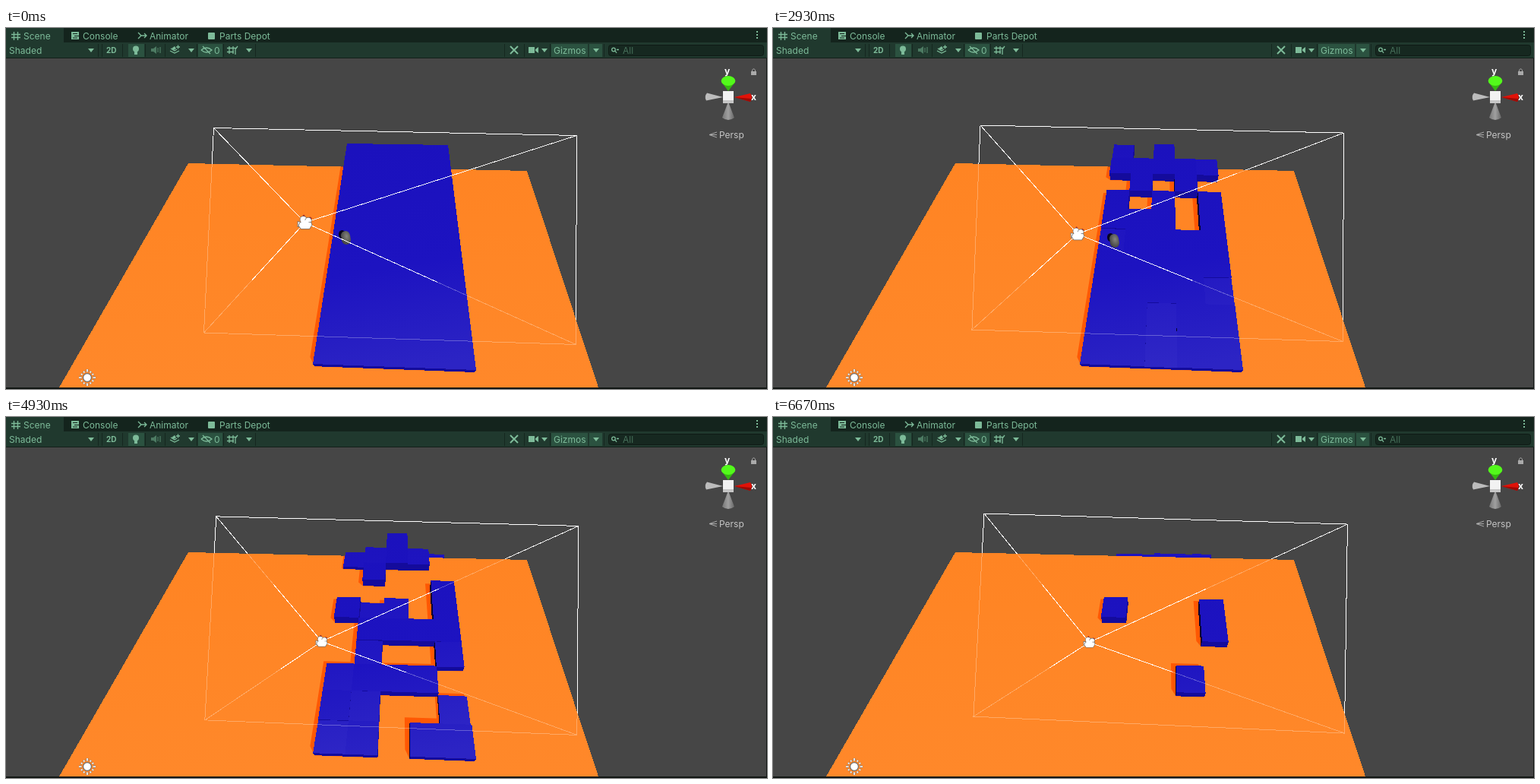
Animation of 1002 by 475 pixels, one loop 6.74 s. Source, as an HTML page:

```html
<!DOCTYPE html>
<html lang="en">
<head>
<meta charset="utf-8">
<title>Falling tiles</title>
<style>
  html, body { margin: 0; width: 100%; height: 100%; overflow: hidden; background: #464646; }
  svg { display: block; width: 1002px; height: 475px; }
  text { font: 12px Inter, "Liberation Sans", sans-serif; fill: #7dbb99; }
  .crisp { shape-rendering: crispEdges; }
  .wire { fill: none; stroke: #fff; stroke-width: 1; shape-rendering: crispEdges; }
  .ico { fill: none; stroke: #7dbb99; stroke-width: 1.3; }
  .solid { fill: #7dbb99; }
</style>
</head>
<body>
<svg viewBox="0 0 1002 475">
  <defs>
    <linearGradient id="top" gradientUnits="userSpaceOnUse" x1="480" y1="150" x2="530" y2="450">
      <stop offset="0" stop-color="#1b11bd"/><stop offset=".55" stop-color="#1d13c1"/><stop offset="1" stop-color="#2c24c4"/>
    </linearGradient>
    <linearGradient id="loose" gradientUnits="userSpaceOnUse" x1="480" y1="150" x2="530" y2="450">
      <stop offset="0" stop-color="#1c12be"/><stop offset=".55" stop-color="#2117c2"/><stop offset="1" stop-color="#3028c6"/>
    </linearGradient>
    <linearGradient id="floor" x1="0" y1="0" x2="0" y2="1">
      <stop offset="0" stop-color="#ff8423"/><stop offset="1" stop-color="#ff882a"/>
    </linearGradient>
    <radialGradient id="pill" cx=".6" cy=".4" r=".65">
      <stop offset="0" stop-color="#85857f"/><stop offset="1" stop-color="#40403f"/>
    </radialGradient>
    <linearGradient id="cone" x1="0" y1="0" x2="1" y2="0">
      <stop offset="0" stop-color="#777"/><stop offset=".5" stop-color="#a0a0a0"/><stop offset="1" stop-color="#666"/>
    </linearGradient>
    <clipPath id="onFloor"><path d="M240 178L686 188L780 473H70Z"/></clipPath>
    <clipPath id="aboveHole"><rect x="430" y="250" width="50" height="42"/></clipPath>
  </defs>

  <rect width="1002" height="475" fill="#464646"/>
  <path id="farWire" class="wire"/>
  <g id="below" class="crisp"></g>
  <path class="crisp" fill="url(#floor)" d="M240 178L686 188L780 473H70Z"/>
  <g clip-path="url(#onFloor)"><path id="shade" fill="#ff5803"/></g>
  <g id="tiles" class="crisp"></g>
  <g clip-path="url(#aboveHole)">
    <g id="player">
      <ellipse id="spot" cx="-5" cy="-4.500" rx="4.500" ry="5.500" fill="#07041c"/>
      <rect x="-6" y="-9" width="12" height="18" rx="6" fill="url(#pill)" transform="rotate(-10)"/>
    </g>
  </g>
  <path id="dimWire" class="wire" opacity=".28" clip-path="url(#onFloor)"/>
  <path id="nearWire" class="wire"/>
  <g id="camera">
    <path d="M-2-10L0-7M6-7L9-5" stroke="#a22" stroke-width="2"/>
    <g fill="#fff" stroke="#6a6a6a" stroke-width="1.600" paint-order="stroke">
      <path d="M-9-1L-5 0V4L-9 5Z"/>
      <circle cx="-2" cy="-4" r="4"/><circle cx="4.500" cy="-2.500" r="3.800"/>
      <path d="M-6 0H8L9 3L6 8H-5L-8 4Z"/>
    </g>
    <path d="M-5-3H5V3H-5Z" fill="#fff"/>
  </g>
  <g id="sun" transform="translate(107 460)">
    <path class="rays" stroke="#777" stroke-width="3" fill="none"/>
    <path class="rays" stroke="#fff" stroke-width="1.600" fill="none"/>
    <circle r="5.400" fill="#fff" stroke="#6b6b6b" stroke-width="1.200"/>
  </g>

  <g id="axes">
    <path fill="url(#cone)" d="M951 97L943 118Q951 124 959 118Z"/>
    <path fill="#bcbcbc" d="M944 91L923 85.500Q919 90 922 95.500Z"/>
    <path fill="#e01208" d="M959 91L980 86Q984 91 980 97Z"/>
    <path fill="#9b0a05" d="M959 91L981 93Q982 95 980 97Z"/>
    <path fill="#36b812" d="M942 71L951 83L960 71Z"/>
    <ellipse cx="951" cy="69.500" rx="9.300" ry="6.500" fill="#53f91b"/>
    <path fill="#f2f2f2" d="M944 83H958V95H944Z"/><path fill="#c6c6c6" d="M944 95H958V99H944Z"/>
    <text x="946" y="61" style="fill:#fff;font-weight:700">y</text>
    <text x="981" y="95" style="fill:#fff;font-weight:700">x</text>
    <path d="M936 137L926 140.500L936 144M926 140.500H936" fill="none" stroke="#aaa"/>
    <text x="939" y="145" style="fill:#c4c4c4">Persp</text>
    <path d="M981 57H988V62H981Z" fill="#aaa"/><path d="M982.500 57V55.500Q984.500 52 986.500 55.500V57" fill="none" stroke="#aaa"/>
  </g>

  <g id="bars">
    <rect width="1002" height="20" fill="#14241d"/>
    <rect width="76" height="20" fill="#20392e"/>
    <rect y="19" width="1002" height="21" fill="#20392e"/>
    <rect y="39" width="1002" height="1" fill="#13201a"/>
    <path fill="#2b5240" d="M161 21H182V38H161ZM253 21H285V38H253ZM718 21H766V38H718ZM768 21H785V38H768Z"/>
    <path stroke="#15271f" d="M121.500 21V38M126.500 21V38M153.500 21V38M183.500 21V38M209.500 21V38M251.500 21V38M286.500 21V38M328.500 21V38M656.500 21V38M682.500 21V38M716.500 21V38M787.500 21V38"/>
    <rect x="793.500" y="22.500" width="204" height="14" rx="3" fill="#162820" stroke="#0f1b15"/>
    <text x="23" y="15">Scene</text>
    <text x="101" y="15">Console</text>
    <text x="189" y="15">Animator</text>
    <text x="281" y="15">Parts Depot</text>
    <text x="4" y="34">Shaded</text>
    <text x="132" y="33" style="font-size:10px;font-weight:700">2D</text>
    <text x="274" y="34">0</text>
    <text x="721" y="34">Gizmos</text>
    <text x="812" y="34" style="fill:#47705a">All</text>
    <path class="ico" d="M10.500 5V16M15.500 5V16M7 8.500H19M7 12.500H19"/>
    <path class="solid" d="M86 5H96V15H86Z"/><path stroke="#14241d" d="M88 7.500H94M90 10.500H96M88 13H94"/>
    <path class="ico" d="M174 6L178 10H185M174 14L178 10M182 7L185 10L182 13"/>
    <rect class="solid" x="266" y="6" width="9" height="9" rx="1"/>
    <path class="solid" d="M988 4H990V6H988ZM988 8H990V10H988ZM988 12H990V14H988Z"/>
    <circle class="solid" cx="171" cy="27.500" r="4"/><path class="solid" d="M169 31H173V35H169Z"/>
    <path fill="#4c7a62" d="M191 27H194L198 24V34L194 31H191Z"/><path class="ico" style="stroke:#4c7a62" d="M200 26V32M203 25V33"/>
    <path class="ico" d="M216 30L222 33L228 30M217 27L222 30L225 28M224 25H229M226.500 22.500V27.500"/>
    <path class="solid" d="M218 27L222 24L224 27L221 29Z"/>
    <path class="ico" d="M257 29Q264 23 271 29Q264 35 257 29M259 24L269 34"/>
    <path class="ico" d="M294 24V34M299 24V34M291 26.500H303M291 31.500H300M302 28V35M305 24L302 28"/>
    <path class="ico" style="stroke-width:2" d="M664 24L674 34M674 24L664 34"/>
    <path class="solid" d="M688 25H696V33H688ZM697 28L701 25V33L697 30Z"/>
    <circle class="ico" cx="800" cy="28.500" r="2.300"/><path class="ico" d="M802 30L804 33M804 28.500H807"/>
    <path id="carets" class="solid"/>
  </g>
  <path class="crisp" fill="#111613" d="M0 473H1002V475H0ZM1001 40H1002V475H1001Z"/>
</svg>
<script>
const LOOP = 6740, STEP = LOOP / 101;
const $ = id => document.getElementById(id);
const set = (el, key, val) => el.setAttribute(key, val);
const poly = pts => 'M' + pts.map(p => p[0].toFixed(2) + ' ' + p[1].toFixed(2)).join('L') + 'Z';
const line = (a, b) => `M${a[0]} ${a[1]}L${b[0]} ${b[1]}`;
const mix = (a, b, k) => a.map((v, i) => v + (b[i] - v) * k);
const noise = n => { const s = Math.sin(n * 12.9898 + 4.1) * 43758.5453; return s - Math.floor(s); };

// Perspective of the platform top: 5 columns by 10 rows
function surface(u, v) {
  u /= 5; v /= 10;
  const g = -0.0100, h = -0.3797, w = 1 + g * u + h * v;
  return [
    (449 + (133 + g * 582) * u + (-45 + h * 404) * v) / w,
    (152 + (2 + g * 154) * u + (290 + h * 442) * v) / w
  ];
}
// Lower a point by d tile heights, towards the vertical vanishing point
const sink = ([x, y], d) => [x + (501 - x) * 0.0245 * d, y + (570 - y) * 0.0245 * d];

// One letter per tile: the wave in which it falls, Z stays
const plan = ['BAEAA', 'DEEDB', 'AEACA', 'CADAE', 'ZDEAZ', 'BEEEZ', 'CDCCD', 'EEEZB', 'EDBDD', 'DEBEE'];
const waves = { A: [2000, 2480], B: [2960, 3250], C: [3760, 4050], D: [4430, 5100], E: [5570, 6200], Z: [1e6, 1e6] };

function addPath(parent, fill) {
  const p = document.createElementNS('http://www.w3.org/2000/svg', 'path');
  set(p, 'fill', fill);
  parent.appendChild(p);
  return p;
}

function makeBox(parent, right) {
  return {
    side: addPath(parent, right ? '#07042e' : '#160d9a'),
    front: addPath(parent, '#140b9c'),
    top: addPath(parent, 'url(#top)')
  };
}

const tiles = [];
plan.forEach((row, v) => [0, 4, 1, 3, 2].forEach(u => {
  const id = v * 5 + u, [from, to] = waves[row[u]];
  tiles.push({
    right: u > 1,
    start: from + (to - from) * noise(id),
    lean: [0, 1, 2, 3].map(i => 0.2 * noise(id * 4 + i + 90)),
    base: [surface(u, v), surface(u + 1, v), surface(u + 1, v + 1), surface(u, v + 1)],
    box: makeBox($('tiles'), u > 1),
    under: v < 2 ? makeBox($('below'), u > 1) : null
  });
}));

function drawBox(box, tile, depth, bottom, wobble) {
  if (depth >= bottom) {
    for (const k in box) set(box[k], 'd', '');
    return;
  }
  const a = tile.base.map((p, i) => sink(p, Math.min(bottom, depth + wobble * tile.lean[i])));
  const b = tile.base.map(p => sink(p, bottom));
  const [i, j] = tile.right ? [0, 3] : [1, 2];
  set(box.side, 'd', poly([a[i], a[j], b[j], b[i]]));
  set(box.front, 'd', poly([a[3], a[2], b[2], b[3]]));
  set(box.top, 'd', poly(a));
  set(box.top, 'fill', wobble ? 'url(#loose)' : 'url(#top)');
}

function shadow(tile, depth) {
  const left = 1 - depth;
  if (left <= 0) return '';
  const f = tile.base.map(p => sink(p, 1));
  const s = f.map(([x, y]) => [x - 6 * left, y - (4 + Math.max(0, y - 200) / 30) * left]);
  return poly([s[0], s[1], f[1], f[2], f[3], s[3]]);
}

function drawTiles(t) {
  let shade = '';
  for (const tile of tiles) {
    const dt = t - tile.start;
    const wobble = t > 1800 ? Math.min(1, Math.max(0, (dt + 850) / 400)) : 0;
    const depth = dt > 0 ? Math.min(2.55, (dt / 260) ** 2) : 0;
    drawBox(tile.box, tile, depth, 1, wobble);
    if (tile.under) drawBox(tile.under, tile, depth, depth + 1, wobble);
    shade += shadow(tile, depth);
  }
  set($('shade'), 'd', shade);
}

function track(keys, t) {
  let i = 0;
  while (i < keys.length - 2 && t > keys[i + 1][0]) i++;
  const a = keys[i], b = keys[i + 1];
  return mix(a, b, Math.min(1, Math.max(0, (t - a[0]) / (b[0] - a[0])))).slice(1);
}

// time, apex, four corners clockwise from top left, reach of the bright rays
const view = [
  [0, 393.5, 256, 273.5, 131.5, 751.4, 141.5, 750.5, 416.5, 260.5, 401, 1],
  [400, 396, 262, 273, 135, 751.4, 145, 750.5, 419, 260, 403, .96],
  [1000, 400, 271, 274, 131, 751.4, 141, 750.5, 415, 261, 400, .9],
  [1600, 400, 272, 274, 129, 751.4, 139, 750.5, 413.5, 261, 398, .89],
  [2930, 401, 271, 273, 128, 751.4, 138, 750.5, 412.5, 262, 397, .88],
  [3730, 403, 275, 274, 129, 751.4, 139, 750.5, 414, 261, 398, .84],
  [4400, 414, 293, 276, 134, 751.5, 145, 751.4, 420, 261, 402, .7],
  [5000, 416, 296, 277, 130, 754.4, 143, 752, 418, 262, 398, .667],
  [5530, 416.5, 296.5, 278, 128, 755.5, 142, 752.4, 417, 263, 396, .665],
  [6670, 416.5, 296.5, 278, 127, 756.5, 141, 752.4, 416, 264, 394, .665]
];
const reach = [.68, .68, .49, .52];

function drawView(t) {
  const k = track(view, t), apex = [k[0], k[1]];
  const corners = [2, 4, 6, 8].map(i => [k[i], k[i + 1]]);
  const all = poly(corners) + corners.map(c => line(apex, c)).join('');
  set($('farWire'), 'd', all);
  set($('dimWire'), 'd', all);
  set($('nearWire'), 'd', corners.map((c, i) => line(apex, mix(apex, c, reach[i] * k[10]))).join(''));
  set($('camera'), 'transform', `translate(${k[0]} ${k[1]}) scale(${.4 + .6 * k[10]})`);
}

const walk = [[0, 447.5, 276], [1000, 449.5, 280], [2930, 449.5, 280], [3730, 451, 282], [4130, 453, 304]];

function drawPlayer(t) {
  const [x, y] = track(walk, t);
  set($('player'), 'transform', `translate(${x} ${y})`);
  set($('spot'), 'opacity', t < 3400 ? 1 : 0);
}

const rays = Array.from({ length: 12 }, (_, i) => {
  const c = Math.cos(i * Math.PI / 6), s = Math.sin(i * Math.PI / 6), r = i % 3 ? 9.5 : 11;
  return line([c * 7.5, s * 7.5], [c * r, s * r]);
}).join('');
document.querySelectorAll('.rays').forEach(p => set(p, 'd', rays));
set($('carets'), 'd', [112, 244, 320, 709, 777].map(x => `M${x - 4} 27H${x + 4}L${x} 32Z`).join(''));

function render(t) {
  drawTiles(t);
  drawView(t);
  drawPlayer(t);
}

const begin = performance.now();
function tick() {
  const t = (performance.now() - begin) % LOOP;
  render(Math.floor(t / STEP) * STEP);
  requestAnimationFrame(tick);
}
tick();
</script>
</body>
</html>
```
